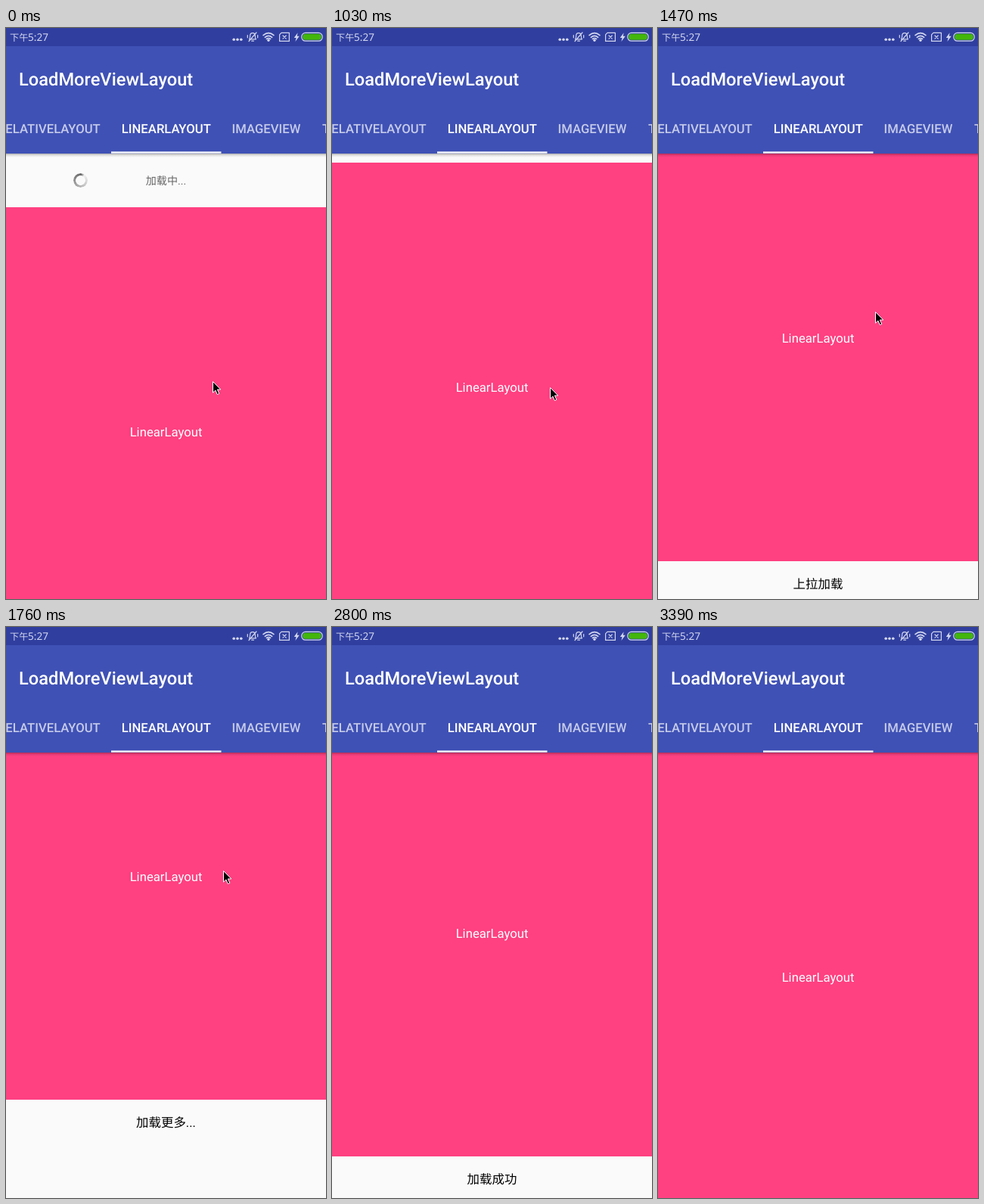
Write an HTML page that moves like this. It is 423 by 755 pixels and loops after 3690 ms.

```html
<!DOCTYPE html>
<html lang="zh-CN">
<head>
<meta charset="utf-8">
<title>Pull to refresh and load more</title>
<style>
  html, body { margin: 0; width: 100%; height: 100%; overflow: hidden; background: #fafafa; }
  svg { display: block; position: absolute; left: 0; top: 0; }
  text {
    font-family: Roboto, "Noto Sans CJK SC", "Noto Sans CJK", sans-serif;
    font-size: 16.7px; text-rendering: geometricPrecision;
  }
  .mid { text-anchor: middle; }
  .tab { font-weight: 500; fill: #fff; fill-opacity: .7; }
  .tab.on { fill-opacity: 1; }
  .icon { fill: none; stroke: #d3d7ee; stroke-width: 1.2; stroke-linecap: round; stroke-linejoin: round; }
  #header { font-size: 14.1px; fill: #666; }
  #footer { font-size: 16.45px; }
  #title { font-size: 23.65px; font-weight: 500; fill: #fff; }
  #spinner {
    position: absolute; left: 89px; top: 192px; width: 19px; height: 19px; border-radius: 50%;
    background: conic-gradient(from 35deg, rgba(100,100,100,.06), rgba(100,100,100,.45) 40%, rgba(95,95,95,.95) 92%, rgba(100,100,100,.1));
    -webkit-mask: radial-gradient(circle, transparent 6px, #000 6.7px);
    mask: radial-gradient(circle, transparent 6px, #000 6.7px);
  }
</style>
</head>
<body>
<svg width="423" height="755" viewBox="0 0 423 755">
  <defs>
    <linearGradient id="shade" x1="0" y1="0" x2="0" y2="1">
      <stop offset="0" stop-color="#000" stop-opacity=".3"/>
      <stop offset=".45" stop-color="#000" stop-opacity=".1"/>
      <stop offset="1" stop-color="#000" stop-opacity="0"/>
    </linearGradient>
  </defs>
  <rect width="423" height="755" fill="#fafafa"/>

  <g id="content">
    <text id="header" class="mid" x="211.5" y="136"></text>
    <rect y="166" width="423" height="592" fill="#ff4081"/>
    <text class="mid" x="211.5" y="469" fill="#fff">LinearLayout</text>
    <text id="footer" class="mid" x="211.5" y="793.5"></text>
  </g>

  <rect y="166" width="423" height="5" fill="url(#shade)"/>
  <rect width="423" height="166" fill="#3f51b5"/>
  <rect width="423" height="24" fill="#303f9f"/>
  <text id="title" x="17" y="76">LoadMoreViewLayout</text>
  <text class="tab" x="124.7" y="139" text-anchor="end">RELATIVELAYOUT</text>
  <text class="tab on mid" x="211.8" y="139">LINEARLAYOUT</text>
  <text class="tab" x="298.5" y="139">IMAGEVIEW</text>
  <text class="tab" x="418" y="139">TEXTVIEW</text>
  <rect x="139" y="163.4" width="145.5" height="2.3" fill="#fff"/>

  <g fill="#d3d7ee">
    <text x="5" y="16.5" style="font-size:12.2px">下午</text>
    <text x="29" y="16.8" style="font-size:13.6px;font-family:'Noto Sans',sans-serif">5:27</text>
    <circle cx="301.2" cy="15.3" r="1.8"/>
    <circle cx="306" cy="15.3" r="1.8"/>
    <circle cx="310.8" cy="15.3" r="1.8"/>
    <path d="M385.6 6.2L380.8 13H383.6L382.4 18L387.8 10.7H384.8Z"/>
    <circle cx="347" cy="16.2" r="1.7"/>
  </g>
  <g class="icon">
    <path d="M321.5 14.8H330.5C329.3 13.6 329.3 12 329.3 10.2A3.3 3.6 0 0 0 322.7 10.2C322.7 12 322.7 13.6 321.5 14.8M324.8 17.2H327.4M331 6L321 17.5M319.3 9.5V12.8M332.7 9.5V12.8"/>
    <path d="M340 9.6Q347 3.6 354 9.6M342.3 12.3Q347 8.4 351.7 12.3M344.4 14.5Q347 12.5 349.6 14.5" stroke-width="1.6"/>
    <path d="M364 6.4H374.4V17.4H361.6V8.8ZM366 10L370.2 14.2M370.2 10L366 14.2"/>
    <rect x="390.8" y="6.4" width="27.4" height="10.8" rx="5"/>
  </g>
  <rect x="392.2" y="7.8" width="24.6" height="8" rx="3.6" fill="#43b60c"/>

  <path id="cursor" d="M.5 .5V15.2L3.9 12L6.3 17.6L8.8 16.5L6.4 11H10.8Z" fill="#000" stroke="#fff"/>
</svg>
<div id="spinner"></div>

<script>
// All times below are counted in ticks, the rate at which the picture changes.
const LOOP = 3690;
const TICK = 147.4;
const LEAD = 12;
const REFRESHED = 5, PULLED = 11, LOADED = 19, POINTER_GONE = 17;
const SPIN_STEP = 45;

// content slides: start, end, distance
const slides = [[5, 8.4, -71], [9.42, 12, -133], [12, 13.2, 75], [20.46, 22.23, 58]];

// pointer path: tick, x, y
const path = [
  [0, 273, 467], [2, 281, 462], [5, 281, 462], [7, 288, 475], [8, 290, 563],
  [10, 287, 375], [11, 287, 322], [12, 287, 322], [14, 356, 610], [15, 354, 604], [16, 374, 671]
];

const $ = id => document.getElementById(id);
const clamp = v => Math.min(1, Math.max(0, v));
const easeOut = p => 1 - (1 - p) ** 2;
const move = (el, x, y) => el.setAttribute('transform', `translate(${x} ${y})`);
const show = (el, on) => { el.style.display = on ? '' : 'none'; };

function label(id, text) {
  if ($(id).textContent !== text) $(id).textContent = text;
}

function offsetAt(k) {
  return slides.reduce((sum, [from, to, by]) =>
    sum + by * easeOut(clamp((k - from) / (to - from))), 71);
}

function pointerAt(k) {
  const next = Math.max(1, path.findIndex(point => point[0] >= k));
  const [a, ax, ay] = path[next - 1], [b, bx, by] = path[next];
  const p = clamp((k - a) / (b - a));
  return [ax + (bx - ax) * p, ay + (by - ay) * p];
}

function draw(t) {
  const k = Math.floor((t + LEAD) / TICK);
  move($('content'), 0, Math.round(offsetAt(k)));
  label('header', k < REFRESHED ? '加载中...' : '更新完成.');
  label('footer', k < PULLED ? '上拉加载' : k < LOADED ? '加载更多...' : '加载成功');

  show($('cursor'), k < POINTER_GONE);
  if (k < POINTER_GONE) move($('cursor'), ...pointerAt(k).map(Math.round));

  show($('spinner'), k < REFRESHED);
  $('spinner').style.transform = `rotate(${k * SPIN_STEP}deg)`;
}

const start = performance.now();
function tick() {
  draw((performance.now() - start) % LOOP);
  requestAnimationFrame(tick);
}
tick();
</script>
</body>
</html>
```
